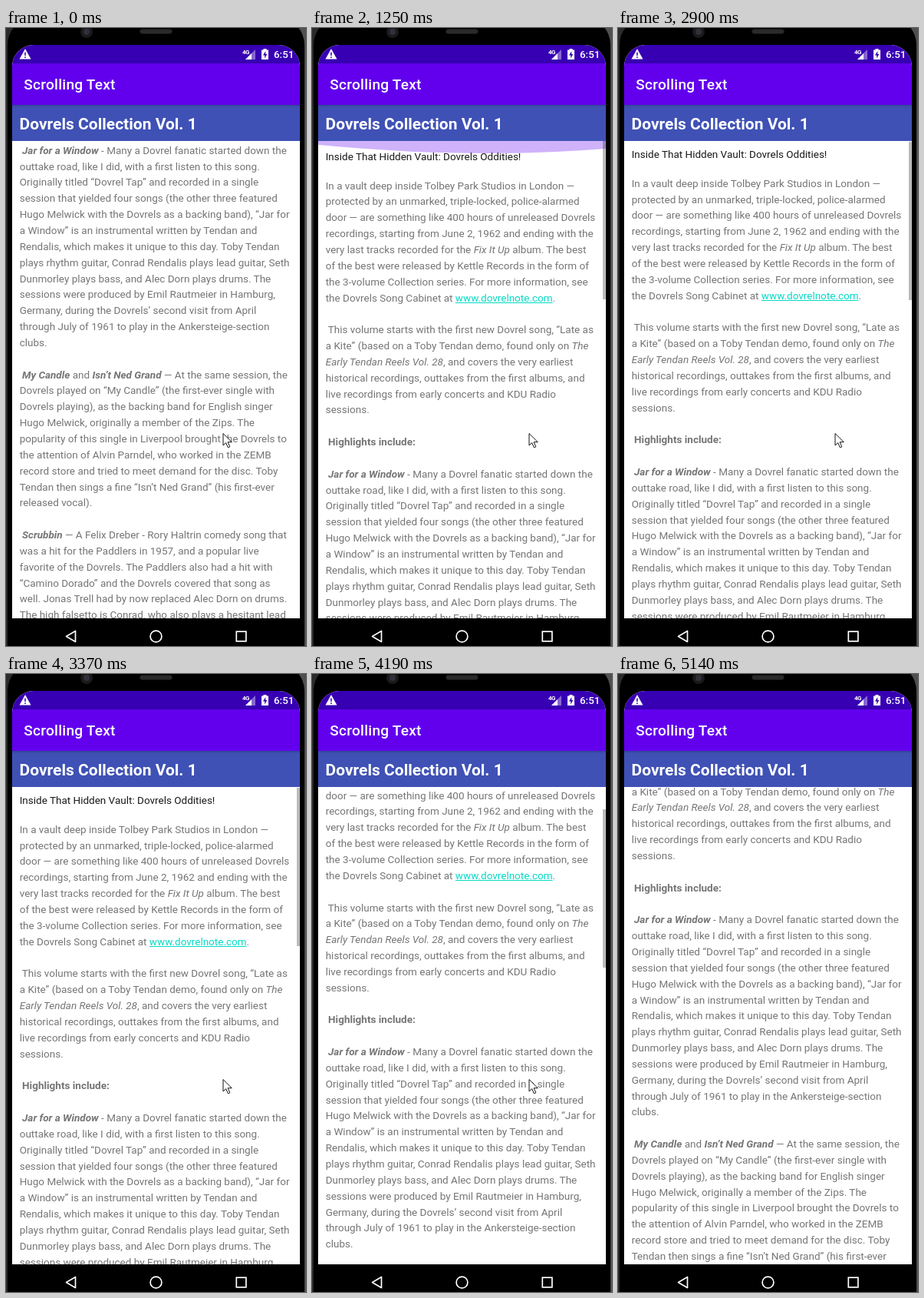
Write an HTML page that moves like this. It is 391 px wide and 804 px high and loops after 5800 ms.

```html
<!DOCTYPE html>
<html lang="en">
<head>
<meta charset="utf-8">
<title>Scrolling Text</title>
<style>
html, body { margin: 0; width: 100%; height: 100%; overflow: hidden; }
body { position: absolute; background: linear-gradient(90deg, #2b2b2b 50%, #505050 50%); font-family: Roboto, sans-serif; color: #fff; }
div, svg { position: absolute; left: 0; top: 0; }
svg { overflow: visible; }
#phone { left: 2px; top: -14px; width: 387px; height: 900px; border-radius: 36px; background: #000; }
#screen { left: 8px; top: 22px; width: 375px; height: 746px; border-radius: 28px 28px 0 0; overflow: hidden; background: #fff; }
#status { width: 375px; height: 24px; background: #3700b3; }
#appbar { top: 24px; width: 375px; height: 54px; background: #6200ee; box-shadow: 0 1px 3px #0004;
  font: 500 19.1px/56px Roboto, sans-serif; letter-spacing: .24px; text-indent: 15.3px; z-index: 1; }
#heading { top: 78px; width: 375px; height: 47px; background: #3f51b5;
  font: 700 21px/50px Roboto, sans-serif; text-indent: 9.6px; }
#view { top: 125px; width: 375px; height: 621px; overflow: hidden; }
#page { left: 9.7px; font-size: 13.5px; line-height: 20.84px; color: #757575; white-space: pre; }
#lead { top: 9.6px; color: #1a1a1a; }
#article { top: 47.6px; }
#article u { color: #03dac5; }
#bar { left: 371px; width: 4px; height: 206px; background: #000; }
</style>
</head>
<body>
<div id="phone"></div>
<svg width="391" height="804">
  <circle cx="105" cy="5" r="8" fill="#1a1a1a"/>
  <circle cx="105" cy="5" r="4" fill="#30303a"/>
  <rect x="174.5" y="1.5" width="42" height="6" rx="3" fill="#2a2a2a" stroke="#161616"/>
  <g fill="none" stroke="#fff" stroke-width="1.7">
    <path d="M90.5 784.5V798.5L78.500 791.500Z" stroke-linejoin="round"/>
    <circle cx="195.5" cy="791.500" r="7.400"/>
    <rect x="300.300" y="785.200" width="12.600" height="12.600"/>
  </g>
</svg>
<div id="screen">
  <div id="status"></div>
  <div id="appbar">Scrolling Text</div>
  <div id="heading">Dovrels Collection Vol. 1</div>
  <div id="view">
    <div id="page"><div id="lead">Inside That Hidden Vault: Dovrels Oddities!</div><div id="article"></div></div>
    <svg width="375" height="30"><path id="glow" d="M0 0V5C130 17 250 20 375 10V0Z" fill="#6200ee"/></svg>
    <div id="bar"></div>
  </div>
</div>
<svg width="391" height="804" fill="#fff">
  <path d="M25 27L32.500 40.500H17.500Z"/>
  <path d="M25 31.500V36M25 37.300V39" stroke="#3700b3" stroke-width="1.500"/>
  <path d="M325 28V41H312Z" opacity=".4"/>
  <path d="M320 33V41H312Z"/>
  <text x="308" y="34" font-size="8" font-weight="700" letter-spacing="-.5">4G</text>
  <path d="M335.500 27H339.500V28.500H342V41H333V28.500H335.500Z"/>
  <path d="M338.300 30L335 35.500H337.200V39.500L340.300 34H338.300Z" fill="#3700b3"/>
  <text x="349" y="39" font-size="13.4" font-weight="500">6:51</text>
  <path id="cursor" d="M.5 .5V16L4.200 12.600 6.900 18.800 9.300 17.800 6.700 11.700H11.800Z" stroke="#111"/>
</svg>
<script>
const $ = id => document.getElementById(id);

$("article").innerHTML = `In a vault deep inside Tolbey Park Studios in London —
protected by an unmarked, triple-locked, police-alarmed
door — are something like 400 hours of unreleased Dovrels
recordings, starting from June 2, 1962 and ending with the
very last tracks recorded for the <i>Fix It Up</i> album. The best
of the best were released by Kettle Records in the form of
the 3-volume Collection series. For more information, see
the Dovrels Song Cabinet at <u>www.dovrelnote.com</u>.

 This volume starts with the first new Dovrel song, “Late as
a Kite” (based on a Toby Tendan demo, found only on <i>The
Early Tendan Reels Vol. 28</i>, and covers the very earliest
historical recordings, outtakes from the first albums, and
live recordings from early concerts and KDU Radio
sessions.

 <b>Highlights include:</b>

 <b><i>Jar for a Window</i></b> - Many a Dovrel fanatic started down the
outtake road, like I did, with a first listen to this song.
Originally titled “Dovrel Tap” and recorded in a single
session that yielded four songs (the other three featured
Hugo Melwick with the Dovrels as a backing band), “Jar for
a Window” is an instrumental written by Tendan and
Rendalis, which makes it unique to this day. Toby Tendan
plays rhythm guitar, Conrad Rendalis plays lead guitar, Seth
Dunmorley plays bass, and Alec Dorn plays drums. The
sessions were produced by Emil Rautmeier in Hamburg,
Germany, during the Dovrels’ second visit from April
through July of 1961 to play in the Ankersteige-section
clubs.

 <b><i>My Candle</i></b> and <b><i>Isn’t Ned Grand</i></b> — At the same session, the
Dovrels played on “My Candle” (the first-ever single with
Dovrels playing), as the backing band for English singer
Hugo Melwick, originally a member of the Zips. The
popularity of this single in Liverpool brought the Dovrels to
the attention of Alvin Parndel, who worked in the ZEMB
record store and tried to meet demand for the disc. Toby
Tendan then sings a fine “Isn’t Ned Grand” (his first-ever
released vocal).

 <b><i>Scrubbin</i></b> — A Felix Dreber - Rory Haltrin comedy song that
was a hit for the Paddlers in 1957, and a popular live
favorite of the Dovrels. The Paddlers also had a hit with
“Camino Dorado” and the Dovrels covered that song as
well. Jonas Trell had by now replaced Alec Dorn on drums.
The high falsetto is Conrad, who also plays a hesitant lead`;

const LOOP = 5800, TICK = LOOP / 43;
const ramp = (k, from, to) => Math.min(1, Math.max(0, (k - from) / (to - from)));

const drags = [
  { from: 2, to: 6, target: 0, ease: p => 1 - (1 - p) ** 1.4 },
  { from: 20, to: 21, target: 2.8, ease: p => p },
  { from: 24, to: 27, target: 30.5, ease: p => p },
  { from: 29, to: 34, target: 260.5, ease: p => p ** 1.5 }
];
const scrollAt = k => drags.reduce(
  (y, d) => y + (d.target - y) * d.ease(ramp(k, d.from, d.to)), 421);

// The scrollbar shows at once when touched and fades after each drag.
function barAt(k) {
  if (k < 3) return 0;
  return 1 - (k < 21 ? ramp(k, 10, 14) : ramp(k, 34, 38));
}

function draw(now) {
  const k = Math.floor((now % LOOP - 5) / TICK);
  const scroll = scrollAt(k);
  const pull = Math.min(ramp(k, 5, 9), 1 - ramp(k, 9, 14));
  $("page").style.top = -scroll + "px";
  $("bar").style.top = scroll * .332 + "px";
  $("bar").style.opacity = .27 * barAt(k);
  $("glow").style.opacity = .3 * pull;
  $("glow").setAttribute("transform", `scale(1 ${pull})`);
  $("cursor").setAttribute("transform", k < 36 ? "translate(282.5 527)" : "translate(320 705)");
  $("cursor").style.opacity = k < 37 ? 1 : 0;
}

const start = performance.now();
function loop() {
  draw(performance.now() - start);
  requestAnimationFrame(loop);
}
loop();
</script>
</body>
</html>
```
